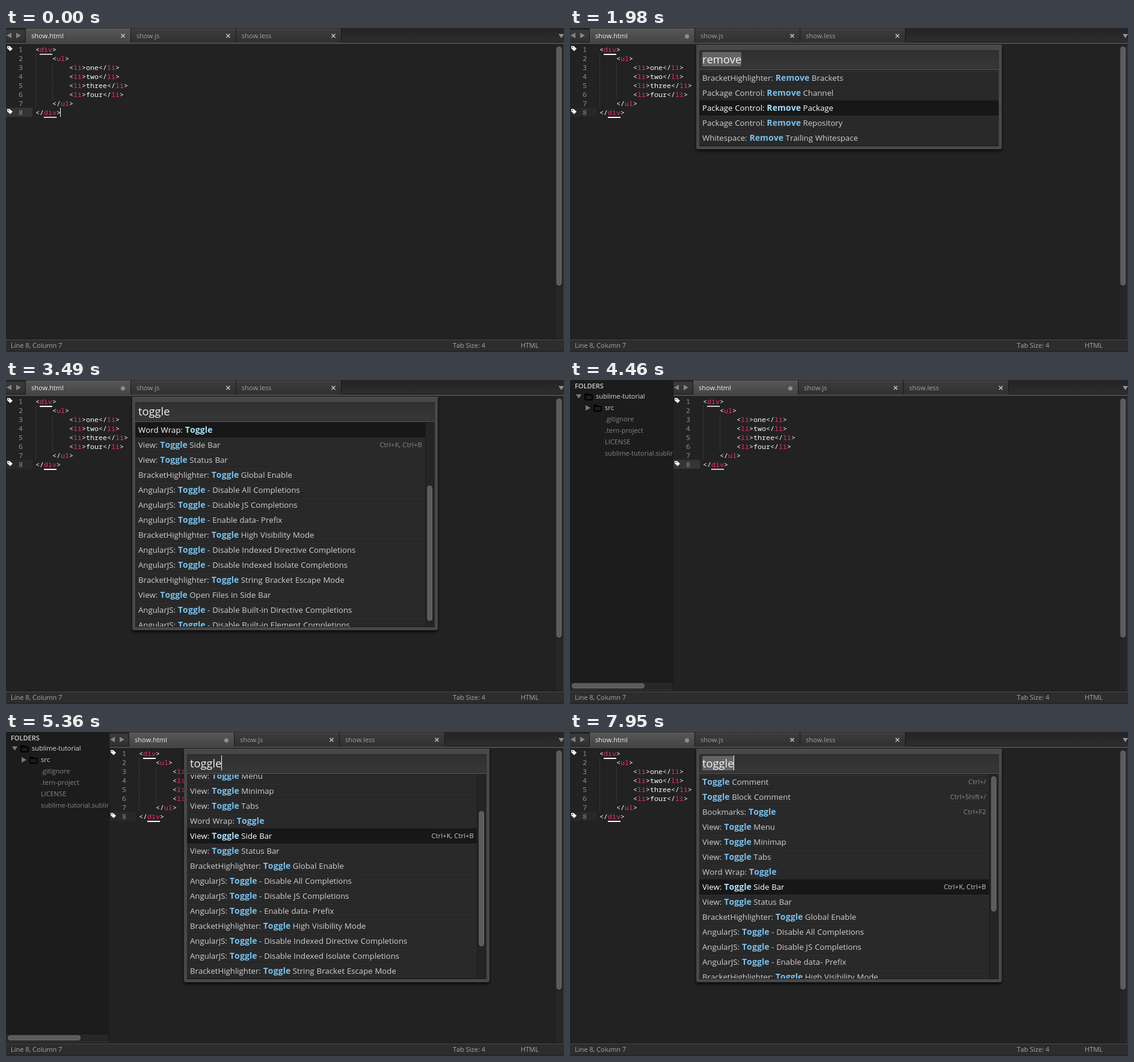
These frames come from a looping animation (928x540 px, 8000 ms). An HTML page with a canvas:

```html
<!DOCTYPE html>
<html lang="en">
<head>
<meta charset="utf-8">
<title>Toggling the side bar</title>
<style>
  html, body { margin: 0; width: 100%; height: 100%; overflow: hidden; background: #222; }
  canvas { display: block; width: 928px; height: 540px; }
</style>
</head>
<body>
<canvas id="stage" width="928" height="540"></canvas>
<script>
const W = 928, H = 540, LOOP = 8000, SIDE = 172;
const ctx = document.getElementById('stage').getContext('2d');
const UI = '"Open Sans", "Noto Sans", sans-serif';
const MONO = '500 11.67px "Noto Sans Mono", "DejaVu Sans Mono", monospace';
const LABEL = `11px ${UI}`;
ctx.fontKerning = 'none';

const CODE = [
  '<div>', '    <ul>',
  ...['one', 'two', 'three', 'four'].map(s => `        <li>${s}</li>`),
  '    </ul>', '</div>'
];

const ng = s => `AngularJS: Toggle - ${s}`;
const bh = s => `BracketHighlighter: ${s}`;
const pkg = s => `Package Control: Remove ${s}`;
const REMOVE = [bh('Remove Brackets'), pkg('Channel'), pkg('Package'), pkg('Repository'),
  'Whitespace: Remove Trailing Whitespace'];
const TOGGLE = [
  'Toggle Comment', 'Toggle Block Comment', 'Bookmarks: Toggle',
  'View: Toggle Menu', 'View: Toggle Minimap', 'View: Toggle Tabs', 'Word Wrap: Toggle',
  'View: Toggle Side Bar', 'View: Toggle Status Bar', bh('Toggle Global Enable'),
  ng('Disable All Completions'), ng('Disable JS Completions'), ng('Enable data- Prefix'),
  bh('Toggle High Visibility Mode'),
  ng('Disable Indexed Directive Completions'), ng('Disable Indexed Isolate Completions'),
  bh('Toggle String Bracket Escape Mode'), 'View: Toggle Open Files in Side Bar',
  ng('Disable Built-in Directive Completions'), ng('Disable Built-in Element Completions')
];
const LOOSE = [...TOGGLE, bh('Select Tag Name (closing and opening)'),
  bh('Select Tag Name (opening and closing)')];
const KEYS = {
  'Toggle Comment': 'Ctrl+/', 'Toggle Block Comment': 'Ctrl+Shift+/',
  'Bookmarks: Toggle': 'Ctrl+F2', 'View: Toggle Side Bar': 'Ctrl+K, Ctrl+B'
};

// Each step overrides part of the state from its time on.
const openToggle = { query: 'toggle', marked: true, pick: 7, scroll: 0, caret: 1 };
const typed = (query, scroll = 175) => ({ query, marked: false, pick: 7, scroll, caret: 1 });
const STEPS = [
  [0, { dirty: false, row: 8, match: true, caret: 1, side: 0, query: '' }],
  [150, { dirty: true, row: 9 }],
  [290, { match: false }],
  [420, { row: 8 }],
  [570, { match: true }],
  [1000, { caret: .5 }], [1130, { caret: 0 }],
  [1430, { query: 'remove', marked: true, pick: 2, scroll: 0, caret: 1 }],
  [1860, { caret: .5 }], [1980, { caret: 0 }],
  [2130, typed('t')], [2260, typed('to')], [2390, typed('tog')], [2520, typed('togg')],
  [2640, typed('toggl', 160)], [2760, typed('toggle', 160)],
  [3030, { pick: 6, scroll: 150 }],
  [3360, { caret: .5 }], [3490, { caret: 0 }],
  [3640, { pick: 7, caret: 1 }],
  [3900, { query: '', side: SIDE / 2 }], [4030, { side: SIDE }],
  [4310, { caret: .5 }], [4460, { caret: 0 }],
  [4580, openToggle],
  [4970, { caret: .5 }], [5100, { caret: 0 }],
  [5230, { marked: false, scroll: 40, caret: 1 }], [5360, { scroll: 85 }],
  [5790, { caret: .5 }], [5930, { caret: 0 }],
  [6070, { query: '', side: SIDE / 2, caret: 1 }], [6210, { side: 0 }],
  [6480, { caret: .5 }], [6610, { caret: 0 }],
  [6740, openToggle],
  [7150, { caret: .5 }], [7300, { caret: 0 }],
  [7830, { caret: .5 }], [7950, { caret: 1 }]
];
const stateAt = t => Object.assign({}, ...STEPS.filter(s => s[0] <= t).map(s => s[1]));

function rect(x, y, w, h, fill) {
  ctx.fillStyle = fill;
  ctx.fillRect(x, y, w, h);
}
function pill(x, y, w, h, r, fill) {
  ctx.fillStyle = fill;
  ctx.beginPath();
  ctx.roundRect(x, y, w, h, r);
  ctx.fill();
}
function poly(fill, ...pts) {
  ctx.fillStyle = fill;
  ctx.beginPath();
  for (let i = 0; i < pts.length; i += 2) ctx.lineTo(pts[i], pts[i + 1]);
  ctx.fill();
}
function text(s, x, y, fill, font = LABEL, align = 'left') {
  ctx.font = font;
  ctx.fillStyle = fill;
  ctx.textAlign = align;
  ctx.fillText(s, x, y);
}
function fade(y0, y1, a, b) {
  const g = ctx.createLinearGradient(0, y0, 0, y1);
  g.addColorStop(0, a);
  g.addColorStop(1, b);
  return g;
}
function clipped(x, y, w, h, draw) {
  ctx.save();
  ctx.beginPath();
  ctx.rect(x, y, w, h);
  ctx.clip();
  draw();
  ctx.restore();
}
function thumb(x, y, w, h) {
  const r = Math.min(w, h) / 2;
  pill(x, y, w, h, r, '#6e6e6e');
  pill(x + 1, y + 1, w - 2, h - 2, r - 1, '#5b5b5b');
}

function drawTab(i, name, dirty) {
  const x = 33 + 175 * i, active = i === 0;
  rect(x, 1, 174, 23, active ? fade(1, 24, '#575757', '#454545') : fade(1, 24, '#3d3d3d', '#303030'));
  rect(x, 1, 174, 1, active ? '#686868' : '#4a4a4a');
  rect(x + 174, 1, 1, 23, '#191919');
  text(name, x + 9, 17, active ? '#f0f0f0' : '#a0a0a0');
  const cx = x + 161.5;
  if (dirty) return pill(cx - 3.5, 10.5, 7, 7, 3.5, '#8e8e8e');
  ctx.strokeStyle = '#c0c0c0';
  ctx.lineWidth = 1.6;
  ctx.beginPath();
  ctx.moveTo(cx - 3, 10); ctx.lineTo(cx + 3, 16);
  ctx.moveTo(cx + 3, 10); ctx.lineTo(cx - 3, 16);
  ctx.stroke();
}

function drawTabBar(s) {
  rect(0, 0, W, 28, fade(0, 24, '#232323', '#2e2e2e'));
  rect(0, 24, W, 3, '#454545');
  rect(0, 23, W, 1, '#1b1b1b');
  rect(0, 27, W, 1, '#191919');
  ctx.save();
  ctx.translate(s.side, 0);
  rect(0, 3, 32, 20, fade(3, 23, '#3a3a3a', '#303030'));
  rect(32, 1, 1, 23, '#191919');
  poly('#858585', 1, 12.5, 9, 8, 9, 17);
  poly('#858585', 25, 12.5, 17, 8, 17, 17);
  ['show.html', 'show.js', 'show.less'].forEach((name, i) => drawTab(i, name, s.dirty && !i));
  rect(33, 23, 174, 2, '#454545');
  ctx.restore();
  poly('#909090', 919, 10, 928, 10, 923.5, 17);
}

function drawTag(y) {
  poly('#f4f4f4', 2, y, 6, y, 11, y + 4.5, 7, y + 8.5, 2, y + 4);
  rect(3.5, y + 1.5, 1.5, 1.5, '#222');
}

function drawLine(line, i) {
  const y = 40 + 15 * i;
  let col = line.search(/\S/), inTag = false;
  for (const part of line.trim().match(/<\/?|>|[^<>]+/g)) {
    text(part, 49 + 7 * col, y, inTag ? '#f92672' : '#f8f8f2', MONO);
    inTag = part[0] === '<';
    col += part.length;
  }
}

function underline(x, y, focused) {
  rect(x, y, 21, 1, '#fff');
  if (!focused) return rect(x, y + 1, 21, 1, '#fff');
  for (let k = 0; k < 21; k += 2) rect(x + k, y + 1, 1, 1, '#fff');
}

function drawEditor(s) {
  const focused = !s.query;
  ctx.save();
  ctx.translate(s.side, 0);
  rect(0, 28 + 15 * (s.row - 1), 44, 15, focused ? '#353535' : '#282828');
  for (let y = 43; y < 133; y += 2) {
    rect(49, y, 1, 1, '#484848');
    if (y > 57 && y < 118) rect(77, y, 1, 1, '#484848');
  }
  for (let n = 1; n <= Math.max(8, s.row); n++) text(n, 28, 25 + 15 * n, '#8f908a', MONO, 'right');
  CODE.forEach(drawLine);
  if (s.match) {
    drawTag(30);
    drawTag(135);
    underline(56, 43, focused);
    underline(63, 148, focused);
  }
  if (focused) {
    const end = s.row === 8;
    rect(end ? 90 : 49, end ? 133 : 148, 1, 15, `rgba(248,248,242,${s.caret})`);
  }
  ctx.restore();
  rect(912, 28, 16, 490, '#262626');
  rect(912, 28, 1, 490, '#1d1d1d');
  rect(926, 28, 2, 490, '#303030');
  thumb(915.5, 31, 8.5, 398);
}

function folder(x, y) {
  pill(x, y, 7, 5, 1.5, '#000');
  pill(x, y + 2, 14, 10, 2, '#000');
  rect(x + 2, y + 4, 10, 6, '#1c1c1c');
}

function drawSidebar(s) {
  if (!s.side) return;
  clipped(0, 0, s.side - 1, 519, () => {
    ctx.translate(s.side - SIDE, 0);
    rect(0, 0, SIDE, 519, '#1c1c1c');
    text('FOLDERS', 8, 14, '#d2d2d2', `600 ${LABEL}`);
    poly('#7c7c7c', 10, 24, 19, 24, 14.5, 31);
    folder(24, 22);
    text('sublime-tutorial', 43, 31, '#d8d8d8');
    poly('#7c7c7c', 26, 42, 34, 46.5, 26, 51);
    folder(39, 41);
    text('src', 58, 50, '#d8d8d8');
    ['.gitignore', '.tern-project', 'LICENSE', 'sublime-tutorial.sublime-project']
      .forEach((name, i) => text(name, 58, 69 + 19 * i, '#858585'));
    rect(0, 503, SIDE, 15, '#262626');
    rect(0, 503, SIDE, 1, '#191919');
    rect(0, 516, SIDE, 1, '#3a3a3a');
    thumb(3, 505.5, 121, 8.5);
  });
  rect(s.side - 1, 0, 1, 519, '#191919');
}

function drawStatus(s) {
  rect(0, 518, W, 22, '#2d2d2d');
  rect(0, 518, W, 1, '#171717');
  rect(0, 519, W, 1, '#4b4b4b');
  rect(0, 538, W, 1, '#202020');
  text(`Line ${s.row}, Column ${s.row === 8 ? 7 : 1}`, 8, 533, '#a6a6a6');
  text('Tab Size: 4', 743, 533, '#a6a6a6');
  text('HTML', 856, 533, '#a6a6a6');
}

// Marks the matched letters: one solid run if possible, else the last ones that fit.
function hits(item, query) {
  const low = item.toLowerCase(), run = low.indexOf(query);
  if (run >= 0) return new Set([...query].map((c, i) => run + i));
  const found = new Set();
  let at = low.length;
  for (const c of [...query].reverse()) {
    at = low.lastIndexOf(c, at - 1);
    found.add(at);
  }
  return found;
}

function drawItem(item, y, width, picked, query) {
  rect(215, y, width, 25, picked ? '#171717' : '#292929');
  if (!picked) rect(215, y, width, 1, '#323232');
  rect(215, y + 24, width, 1, picked ? '#141414' : '#202020');
  const found = hits(item, query);
  let x = 220;
  ctx.wordSpacing = '0.4px';
  for (let i = 0, j; i < item.length; i = j) {
    const bold = found.has(i);
    for (j = i + 1; j < item.length && found.has(j) === bold;) j++;
    const part = item.slice(i, j);
    ctx.letterSpacing = bold ? '0.1px' : '0px';
    const fill = bold ? (picked ? '#a9e0fc' : '#78c1ec') : (picked ? '#fff' : '#d0d0d0');
    text(part, x, y + 17, fill, bold ? `bold 14px ${UI}` : `13.2px ${UI}`);
    x += ctx.measureText(part).width;
  }
  ctx.letterSpacing = ctx.wordSpacing = '0px';
  if (KEYS[item]) text(KEYS[item], 692, y + 16, picked ? '#c8c8c8' : '#888', `11.4px ${UI}`, 'right');
}

function drawPalette(s) {
  if (!s.query) return;
  const list = s.query === 'remove' ? REMOVE : s.query.length < 5 ? LOOSE : TOGGLE;
  const full = list.length * 25, view = Math.min(full, 340);
  const long = full > view, width = long ? 482 : 498;
  ctx.save();
  ctx.translate(s.side / 2, 0);
  ctx.save();
  ctx.shadowColor = 'rgba(0,0,0,.75)';
  ctx.shadowBlur = 5;
  ctx.shadowOffsetY = 3;
  pill(210, 28, 508, view + 49, [0, 0, 3, 3], '#484848');
  ctx.restore();
  rect(210, 28, 508, 1, '#555');

  rect(215, 37, 498, 31, '#292929');
  rect(216, 38, 496, 29, fade(38, 67, '#303030', '#373737'));
  const font = `18.3px ${UI}`;
  ctx.font = font;
  const end = Math.round(220 + ctx.measureText(s.query).width);
  if (s.marked) pill(220, 40, end - 220, 24, 2, '#646464');
  text(s.query, 220, 59, '#f2f2f2', font);
  rect(end, 39, 1, 25, `rgba(255,255,255,${s.caret})`);

  rect(215, 70, 498, view + 2, '#1e1e1e');
  clipped(215, 71, 498, view, () => {
    list.forEach((item, i) => {
      const y = 71 + 25 * i - s.scroll;
      if (y > 46 && y < 71 + view) drawItem(item, y, width, i === s.pick, s.query);
    });
    if (!long) return;
    rect(697, 71, 16, view, '#242424');
    rect(697, 71, 1, view, '#1b1b1b');
    const size = 334 * view / full - 2;
    thumb(700.5, 74 + (334 - size) * s.scroll / (full - view), 8.5, size);
  });
  ctx.restore();
}

function draw(now) {
  const s = stateAt(now % LOOP);
  rect(0, 0, W, H, '#222');
  drawTabBar(s);
  drawEditor(s);
  drawSidebar(s);
  drawStatus(s);
  drawPalette(s);
}

const start = performance.now();
(function tick() {
  draw(performance.now() - start);
  requestAnimationFrame(tick);
})();
</script>
</body>
</html>
```
